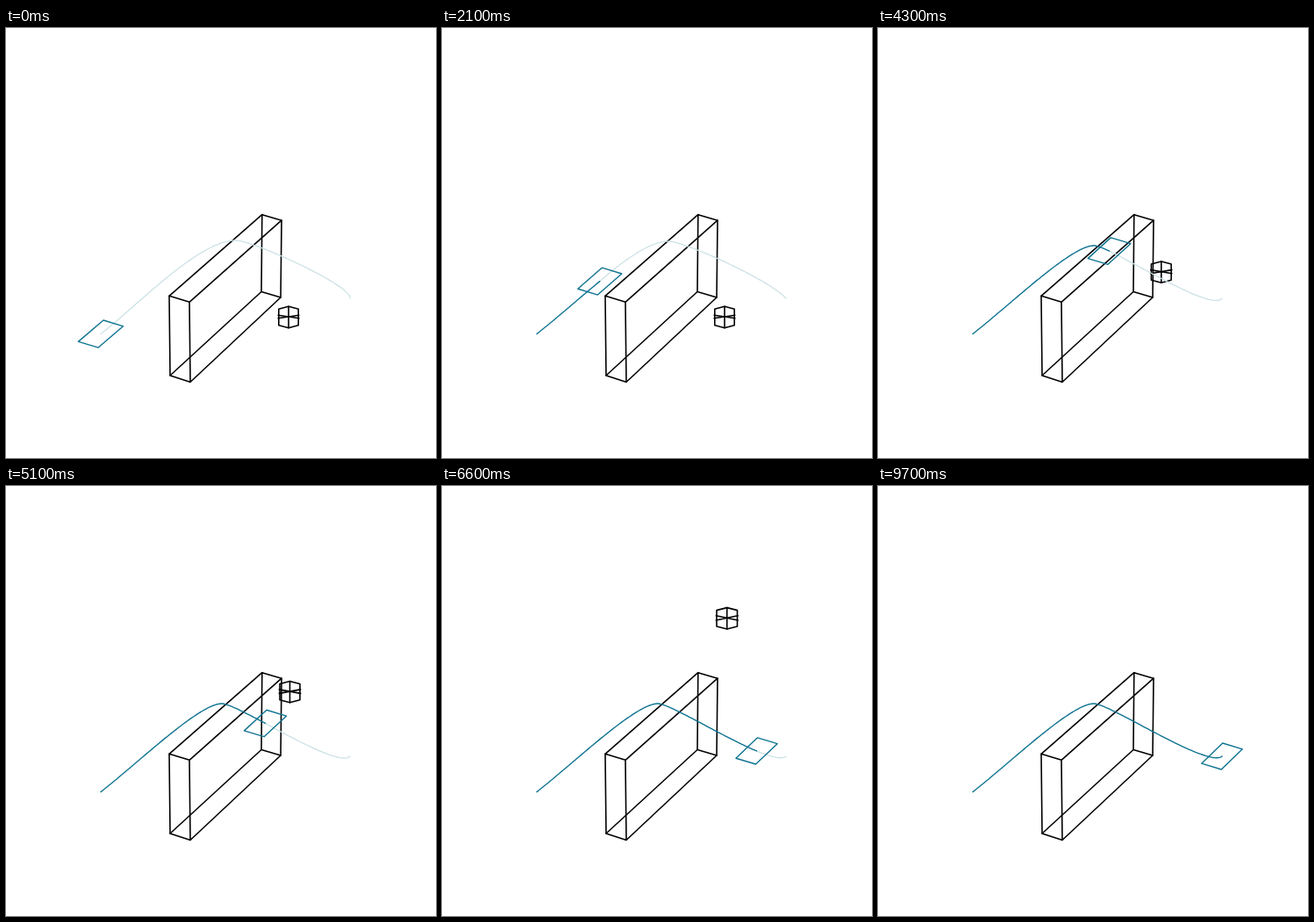
Write an HTML page with a canvas that moves like this. It is 490 by 490 pixels and loops after 10000 ms.

```html
<!DOCTYPE html>
<html>
<head>
<meta charset="utf-8">
<style>
html, body { margin: 0; width: 100%; height: 100%; overflow: hidden; background: #fff; }
canvas { display: block; }
</style>
</head>
<body>
<canvas id="c" width="490" height="490"></canvas>
<script>
const ctx = document.getElementById('c').getContext('2d');
const TEAL = '#0f7391', PALE = '#cce2e6', BLACK = '#000';
const START = [108, 348.6], GOAL = [392, 308];

// each route: its peak, and the handle that shapes its arrival at the goal
const FIRST = { peak: [262, 242], arrive: [394, 293] };
const SECOND = { peak: [258, 243], arrive: [372, 286.5] };
const DIP = { peak: [246, 248], arrive: [380, 327] };
const FLOWN = { peak: [246, 248], arrive: [376, 322] };

const clamp = k => Math.min(1, Math.max(0, k));
const mix = (a, b, k) => a.map((v, i) => v + (b[i] - v) * k);
const blend = (r, s, k) => ({ peak: mix(r.peak, s.peak, k), arrive: mix(r.arrive, s.arrive, k) });

function bezier(a, b, c, d, u) {
  const ab = mix(a, b, u), bc = mix(b, c, u), cd = mix(c, d, u);
  return mix(mix(ab, bc, u), mix(bc, cd, u), u);
}

function trace({ peak, arrive }) {
  const [px, py] = peak, pts = [];
  for (let u = 0; u < 1; u += 1 / 64) pts.push(bezier(START, [152, 314.3], [220, py], peak, u));
  for (let u = 0; u <= 1; u += 1 / 64) pts.push(bezier(peak, [px + 18, py], arrive, GOAL, u));
  return pts;
}

function heightAt(pts, x) {
  const i = Math.max(1, pts.findIndex(p => p[0] >= x));
  const [a, b] = [pts[i - 1], pts[i]];
  return a[1] + (b[1] - a[1]) * (x - a[0]) / (b[0] - a[0]);
}

function line(points, color, width, close) {
  ctx.beginPath();
  points.forEach(p => ctx.lineTo(p[0], p[1]));
  if (close) ctx.closePath();
  ctx.strokeStyle = color;
  ctx.lineWidth = width;
  ctx.stroke();
}

function wall() {
  const front = [[186, 305.3], [209, 312.3], [210, 403.5], [187, 396]];
  const back = [[291.8, 212.7], [314, 219.2], [313, 307], [291, 300.5]];
  line(front, BLACK, 1.6, true);
  line(back, BLACK, 1.6, true);
  front.forEach((p, i) => line([p, back[i]], BLACK, 1.6));
}

function cube(t) {
  const s = Math.max(0, t - 3.335);
  const rise = 52.6 * s + 0.65 * s * s;
  const k = rise / 260;
  const x = 322 + 4 * k, y = 329.5 - rise;
  const w = 11.2 + 0.8 * k, m = 1.8 + 1.2 * k;
  const draw = (pts, close) => line(pts.map(p => [x + p[0] * w, y + p[1]]), BLACK, 1.6, close);
  draw([[0, -12.2], [1, -9.2], [1, 9.2], [0, 12.2], [-1, 9.2], [-1, -9.2]], true);
  draw([[0, -12.2], [0, 12.2]]);
  for (const e of [m, -m]) draw([[-1.06, e - 0.5], [1.06, -e - 0.5]]);
}

// speeds up, cruises, brakes once for the new route, then eases into the goal
function travel(t) {
  if (t > 6.6) return GOAL[0] - 33.5 * Math.pow(1 - clamp((t - 6.6) / 2.8), 3.2);
  const b = clamp((t - 3.4) / 1.2);
  const cruise = t < 0.78 ? t * t / 1.56 : t - 0.39;
  return START[0] + 42 * cruise - 10.3 * b * b * (3 - 2 * b);
}

function route(t) {
  return t < 3.35 ? blend(FIRST, SECOND, t / 2.1) : blend(DIP, FLOWN, clamp((t - 3.4) / 2.4));
}

function vehicle(x, y) {
  const k = (x - START[0]) / 284;
  const side = [11.3, 3.4], nose = mix([14.3, -12.2], [12, -11.6], k);
  const corner = ([a, b]) => [x + a * side[0] + b * nose[0], y + a * side[1] + b * nose[1]];
  line([[-1, -1], [-1, 1], [1, 1], [1, -1]].map(corner), TEAL, 1.4, true);
}

const flown = trace(FLOWN);

function frame() {
  const t = Math.floor(performance.now() % 10000 / 100) / 10;
  const x = travel(t), y = heightAt(flown, x), here = [x, y];
  const plan = trace(route(t));
  const gap = y - heightAt(plan, x);
  // the plan always leaves from the vehicle
  const ahead = plan.filter(p => p[0] > x).map(p => [p[0], p[1] + gap * Math.exp((x - p[0]) / 20)]);

  ctx.fillStyle = '#fff';
  ctx.fillRect(0, 0, 490, 490);
  ctx.lineJoin = ctx.lineCap = 'round';
  wall();
  cube(t);
  line([here, ...ahead], PALE, 1.3);
  if (t > 0) line([...flown.filter(p => p[0] < x), here], TEAL, 1.4);
  vehicle(x, y);
  requestAnimationFrame(frame);
}
frame();
</script>
</body>
</html>
```
